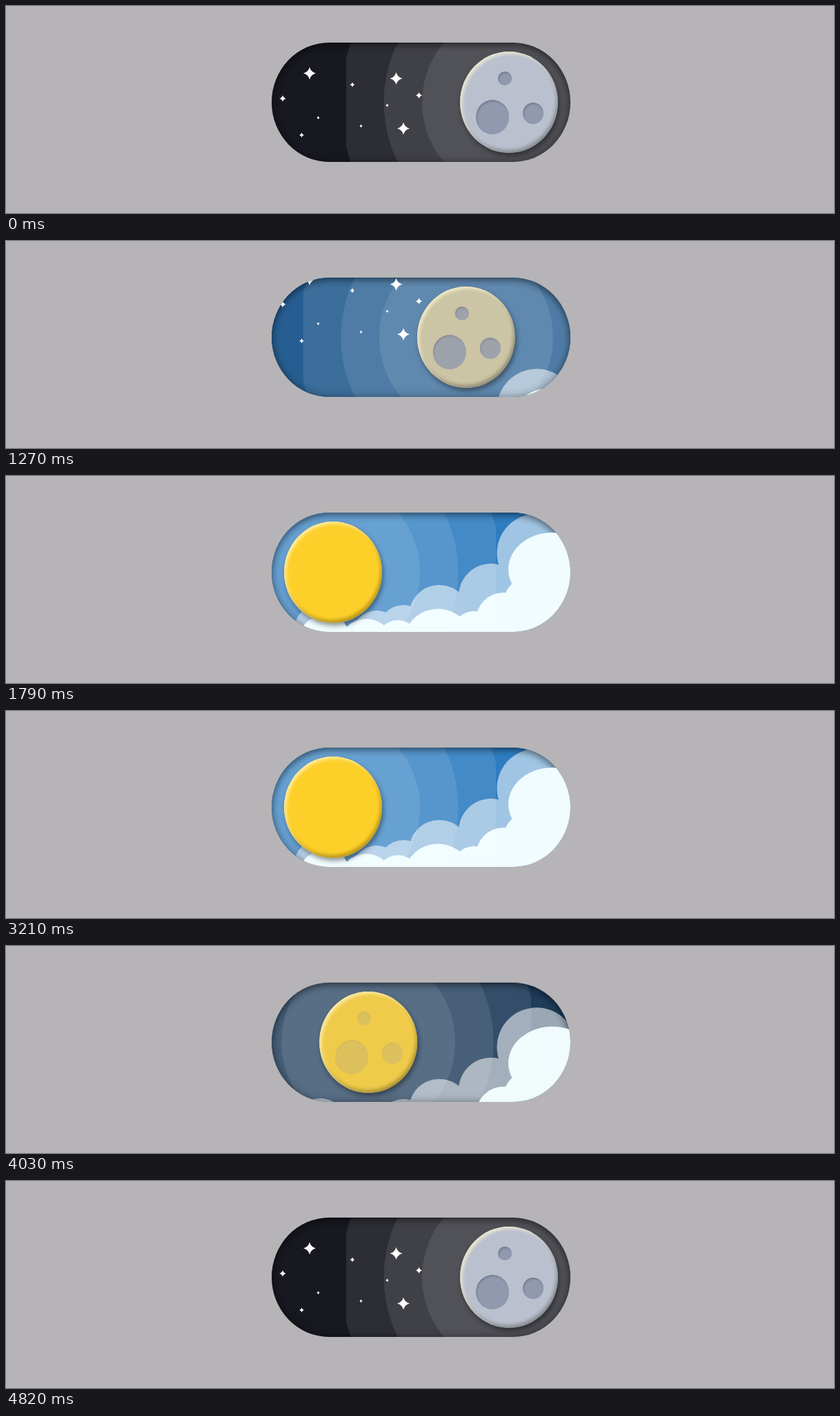
Recreate the animation shown at these times as an HTML page without scripts. Size 1200 by 300 pixels, loop 5480 ms.

```html
<!DOCTYPE html>
<html lang="en">
<head>
<meta charset="utf-8">
<title>Day and night switch</title>
<style>
@property --day { syntax: "<number>"; inherits: true; initial-value: 0; }
@property --sky { syntax: "<number>"; inherits: true; initial-value: 0; }

html, body { margin: 0; width: 100%; height: 100%; overflow: hidden; background: #b6b4b7; }

.pill {
  position: absolute; left: 385px; top: 53px; width: 433px; height: 173px;
  border-radius: 83.6px / 86.5px; overflow: hidden; background: #181821;
  animation: day 5480ms infinite, sky 5480ms infinite;
}
.pill > * { position: absolute; inset: 0; }
svg { width: 433px; height: 173px; }

.blue { background: #2e7dc0; opacity: var(--sky); }
.rings { fill: #fff; fill-opacity: calc(.09 + .012 * var(--sky)); transform: translateX(calc(var(--day) * -255px)); }
.clouds { transform: translateY(calc((1 - var(--day)) * 173px)); }
.back { fill: #fff; opacity: .55; }
.front { fill: #f4feff; opacity: .97; }
.stars { fill: #fff; transform: translateY(calc(var(--day) * -173px)); }
.shade {
  border-radius: inherit;
  box-shadow: inset 0 4px 8px rgba(0, 0, 0, .32), inset 0 0 14px rgba(0, 0, 0, .3);
}

.pill > .disc {
  inset: 13px auto auto 273px; width: 142px; height: 147px; border-radius: 50%;
  background: #bac0cd; box-shadow: 2px 4px 7px rgba(0, 0, 0, .42);
  transform: translateX(calc(var(--day) * -255px));
}
.disc::before, .disc::after { content: ""; position: absolute; inset: 0; border-radius: 50%; }
.disc::before { background: #fdcf29; opacity: var(--day); }
.disc::after {
  box-shadow: inset 3px 3px 5px rgba(255, 250, 212, .72), inset -2px -4px 5px rgba(0, 0, 0, .28);
}
.disc i {
  position: absolute; border-radius: 50%; background: #9099ae; opacity: calc(1 - var(--day));
  box-shadow: inset 1px 2px 3px rgba(0, 0, 0, .2);
}

@keyframes day {
  0%, 18.32% { --day: 0; animation-timing-function: cubic-bezier(.65, 0, .35, 1); }
  30.64%, 69% { --day: 1; animation-timing-function: cubic-bezier(.65, 0, .35, 1); }
  81.31%, 100% { --day: 0; }
}
@keyframes sky {
  0%, 18.32% { --sky: 0; animation-timing-function: ease-in-out; }
  26.17%, 69% { --sky: 1; animation-timing-function: ease-in-out; }
  76.84%, 100% { --sky: 0; }
}
</style>
</head>
<body>
<div class="pill">
  <div class="blue"></div>

  <svg viewBox="385 53 433 173">
    <clipPath id="cut"><rect x="493" y="0" width="472" height="300"/></clipPath>
    <g class="rings">
      <ellipse cx="729" cy="139.5" rx="244" ry="252.5" clip-path="url(#cut)"/>
      <ellipse cx="729" cy="139.5" rx="181.5" ry="188"/>
      <ellipse cx="729" cy="139.5" rx="126" ry="130.5"/>
    </g>
    <g class="clouds">
      <g class="back">
        <circle cx="455" cy="224" r="38"/>
        <circle cx="537" cy="230" r="35"/>
        <circle cx="576" cy="223" r="36"/>
        <circle cx="628" cy="202" r="44"/>
        <circle cx="703" cy="174" r="47"/>
        <circle cx="769" cy="112" r="57.5"/>
        <path d="M537 226V212L628 190L703 160L769 112H830V226Z"/>
      </g>
    </g>
  </svg>

  <div class="shade"></div>

  <svg viewBox="385 53 433 173">
    <defs><path id="s" d="M0-1Q.2-.2 1 0Q.2 .2 0 1Q-.2 .2-1 0Q-.2-.2 0-1Z"/></defs>
    <g class="clouds">
      <g class="front">
        <circle cx="462" cy="242" r="40"/>
        <circle cx="522" cy="247" r="40"/>
        <circle cx="568" cy="241" r="32"/>
        <circle cx="626" cy="242.5" r="50"/>
        <circle cx="678" cy="228" r="32"/>
        <circle cx="721" cy="209" r="40"/>
        <circle cx="762" cy="187" r="42"/>
        <ellipse cx="792" cy="135" rx="64" ry="53"/>
        <path d="M678 226L721 200L762 170L792 135H830V226Z"/>
      </g>
    </g>
    <g class="stars">
      <use href="#s" transform="translate(440 97.5) scale(9)"/>
      <use href="#s" transform="translate(565.5 105) scale(9)"/>
      <use href="#s" transform="translate(576 177.5) scale(9)"/>
      <use href="#s" transform="translate(401 134) scale(4.8)"/>
      <use href="#s" transform="translate(598.5 129.5) scale(4.8)"/>
      <use href="#s" transform="translate(502 114) scale(3.5)"/>
      <use href="#s" transform="translate(428.5 187) scale(3.5)"/>
      <use href="#s" transform="translate(452.5 162) scale(2.4)"/>
      <use href="#s" transform="translate(514.5 174) scale(2.4)"/>
      <use href="#s" transform="translate(552.5 144) scale(2.4)"/>
    </g>
  </svg>

  <div class="disc">
    <i style="left:54.5px;top:28.5px;width:20px;height:20.5px"></i>
    <i style="left:23px;top:69.5px;width:48px;height:50px"></i>
    <i style="left:91px;top:74px;width:30px;height:31px"></i>
  </div>
</div>
</body>
</html>
```
